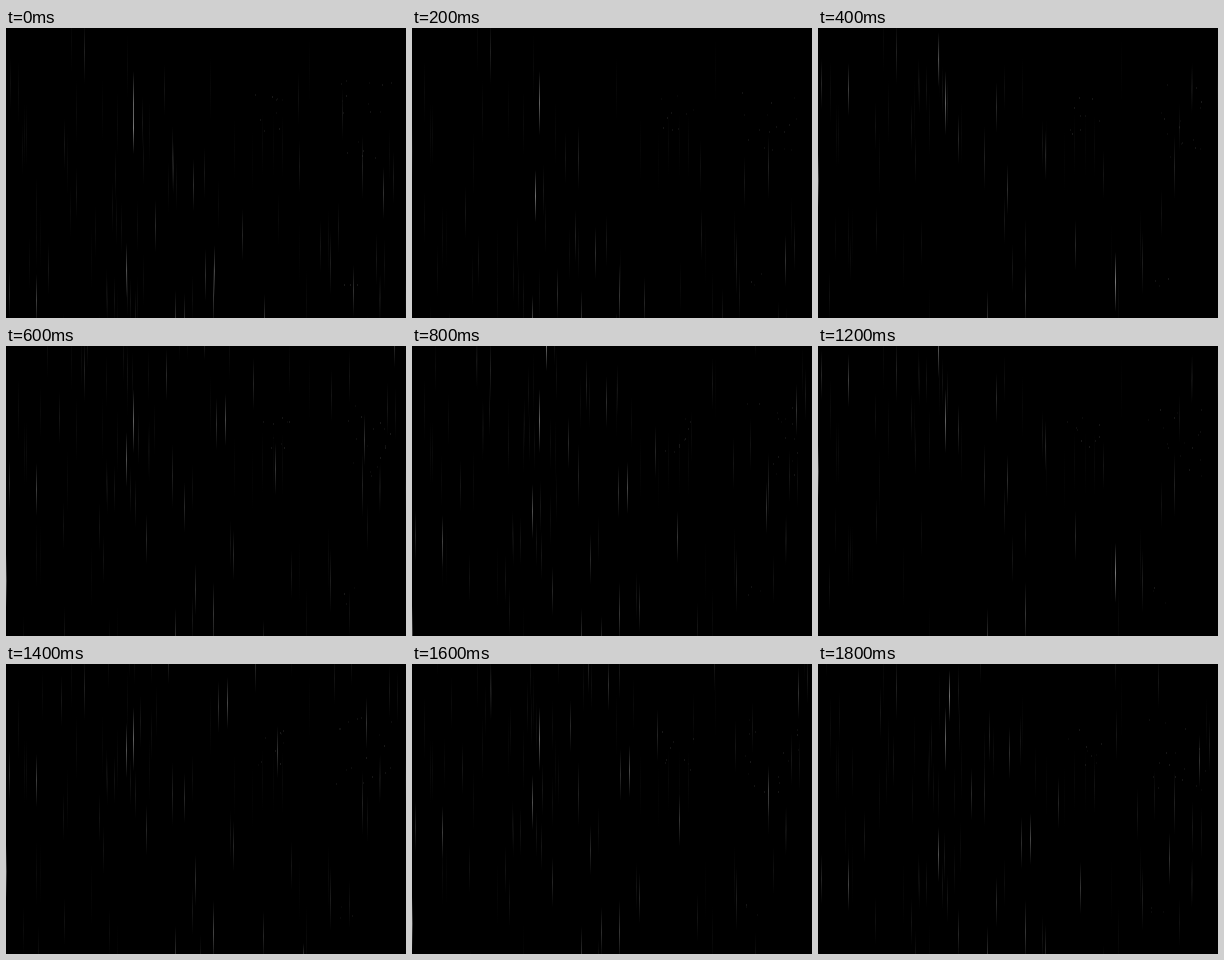
An HTML page with a canvas for the animation above (2 s loop, 400 by 290 pixels).

```html
<!DOCTYPE html>
<html lang="en">
<head>
<meta charset="utf-8">
<title>Night rain</title>
<style>
html, body { margin: 0; width: 100%; height: 100%; overflow: hidden; background: #000; }
canvas { display: block; }
</style>
</head>
<body>
<canvas id="stage" width="400" height="290"></canvas>
<script>
const ctx = document.getElementById("stage").getContext("2d");
const W = 400, H = 290, STEP = 200, STEPS = 10;

function seeded(seed) {
  return () => {
    seed = (seed * 1664525 + 1013904223) >>> 0;
    return seed / 4294967296;
  };
}

// Faint drops scattered over a box, to surround the few bright ones
function scatter(seed, count, top, bottom, alpha) {
  const random = seeded(seed);
  return Array.from({ length: count }, () => [
    random() * W, top + random() * (bottom - top), alpha * (.4 + random() * .6)
  ]);
}

// Each drop: x, y, opacity
const lingering = [
  [127, 43, .44], [207, 236, .24], [169, 262, .24], [166, 98, .14],
  [78, -8, .14], [324, 203, .13], [356, 107, .14],
  ...scatter(11, 24, -30, 260, .05)
];
const straight = [
  [30, 35, .28], [120, 4, .36], [0, 126, .3], [297, 224, .55], [189, 136, .2],
  [178, 54, .18], [140, 86, .17], [227, 102, .17], [3, 31, .16], [257, 192, .17],
  ...scatter(23, 24, 20, 260, .1)
];
const slanted = [
  [138, -95, .5], [219, 48, .32], [210, 52, .2], [198, -38, .2], [160, 3, .18],
  [247, 12, .16], [358, 68, .22], [269, 97, .24], [388, -30, .22], [178, -55, .14],
  ...scatter(37, 34, -150, 100, .1)
];

function streak(x, y, length, alpha) {
  if (y > H || y + length < 0) return;
  const fade = ctx.createLinearGradient(0, y, 0, y + length);
  fade.addColorStop(0, "rgba(220,220,220,0)");
  fade.addColorStop(.5, `rgba(220,220,220,${alpha})`);
  fade.addColorStop(1, "rgba(220,220,220,0)");
  ctx.fillStyle = fade;
  ctx.fillRect(Math.floor(x), y, 1, length);
}

// Two showers per loop; the second starts slightly higher up
function shower(step) {
  const first = step >= 2 && step < 6;
  return { first, age: first ? step - 2 : (step + 4) % STEPS };
}

function drawStraight({ first, age }) {
  const fall = (first ? 0 : -27) + (age ? 30 + 52 * age : 0);
  for (const [x, y, alpha] of straight) streak(x, y + fall, 46 + alpha * 25, alpha);
}

function drawSlanted({ first, age }) {
  if (age === 0) return;
  const fall = (first ? 0 : -35) + 68 * (age - 1);
  for (const [x, y, alpha] of slanted) streak(x - fall * .065 + .5, y + fall, 52, alpha);
}

function drawSplashes(step) {
  const random = seeded(500 + step * 131);
  const flecks = (count, left, top, width, height) => {
    for (let i = 0; i < count; i++) {
      ctx.fillStyle = `rgba(200,200,200,${.03 + random() * .09})`;
      ctx.fillRect(Math.floor(left + random() * width), Math.floor(top + random() * height), 1, 2);
    }
  };
  flecks(9, 248, 64, 36, 42);
  flecks(16, 330, 52, 58, 78);
  flecks(3, 331, 240, 23, 18);
}

function draw(step) {
  ctx.fillStyle = "#000";
  ctx.fillRect(0, 0, W, H);
  for (const [x, y, alpha] of lingering) streak(x, y, 64, alpha);
  const rain = shower(step);
  drawStraight(rain);
  drawSlanted(rain);
  drawSplashes(step);
}

let shown = -1;
function tick() {
  const step = Math.floor(performance.now() / STEP) % STEPS;
  if (step !== shown) draw(shown = step);
  requestAnimationFrame(tick);
}
tick();
</script>
</body>
</html>
```
